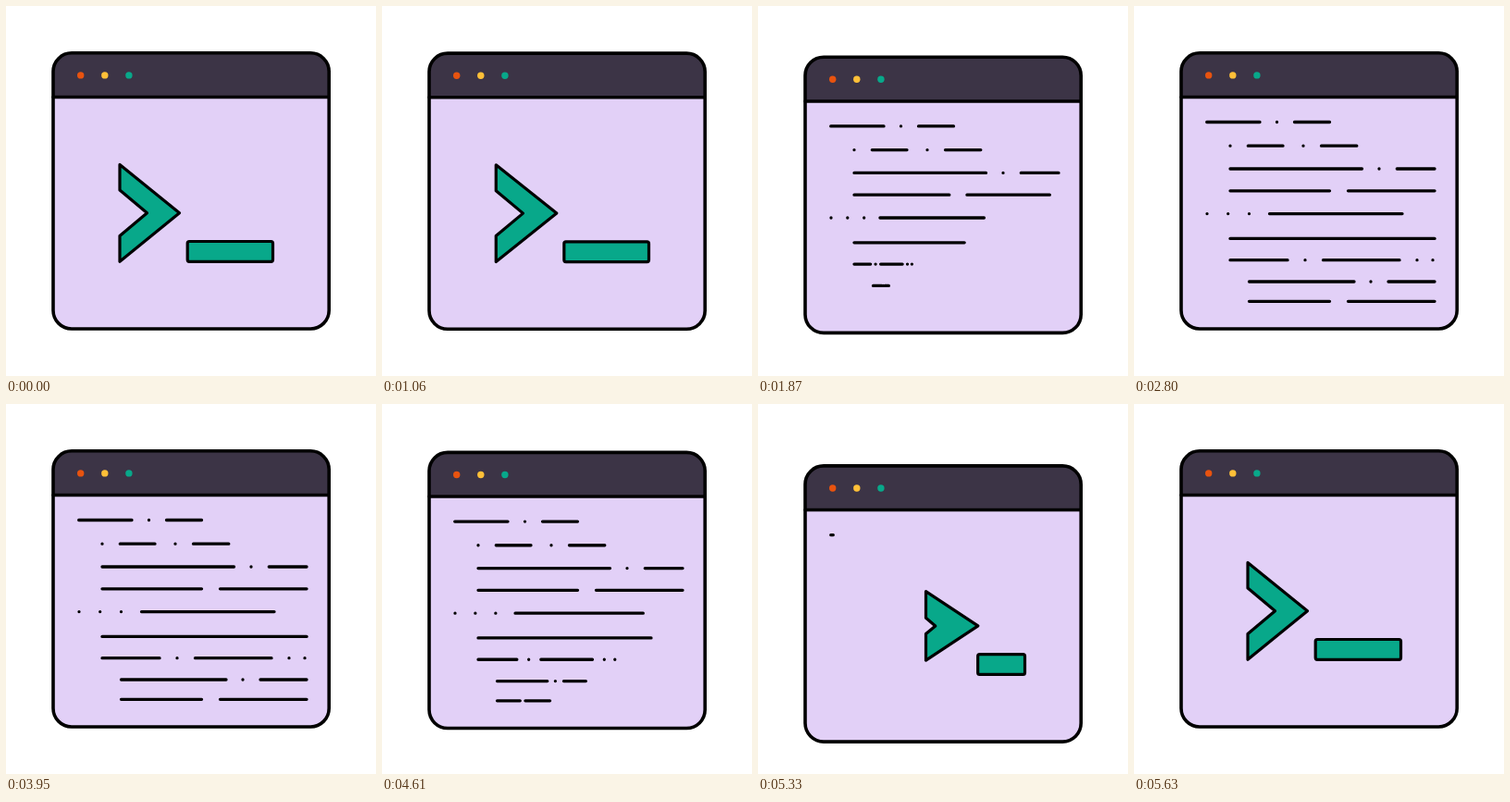
Recreate the animation shown at these times as an HTML page with a canvas. Size 400 px wide and 400 px high, loop 5.66 s.

```html
<!DOCTYPE html>
<html lang="en">
<head>
<meta charset="utf-8">
<title>Terminal</title>
<style>
  html, body { margin: 0; width: 100%; height: 100%; overflow: hidden; background: #fff; }
  canvas { display: block; width: 400px; height: 400px; }
</style>
</head>
<body>
<canvas id="stage"></canvas>
<script>
const LOOP = 5660;
const GREEN = '#08a88a';

// Code rows: baseline, time the row starts to retract, then segments [from, to]; a single number is a dot.
const rows = [
  { y: 125.5, leave: 4891, parts: [[78.7, 136], 154.5, [173.5, 211.5]] },
  { y: 151.2, leave: 4843, parts: [104, [123.3, 161], 183, [202.5, 240.8]] },
  { y: 176, leave: 4780, parts: [[104, 246.5], 265, [284.3, 325]] },
  { y: 199.8, leave: 4696, parts: [[104, 211.5], [231.5, 325]] },
  { y: 224.6, leave: 4556, parts: [79, 101.7, 124.5, [146.5, 290]] },
  { y: 251.4, leave: 4492, parts: [[104, 325]] },
  { y: 274.7, leave: 4428, parts: [[104, 166], 185, [204.5, 287], 306, 323] },
  { y: 298, leave: 4364, parts: [[124.5, 238], 256, [275, 325]] },
  { y: 319.3, leave: 4300, parts: [[124.5, 211.5], [231.5, 325]] }
];

const canvas = document.getElementById('stage');
const ctx = canvas.getContext('2d');
const density = window.devicePixelRatio || 1;
canvas.width = canvas.height = 400 * density;
ctx.lineCap = ctx.lineJoin = 'round';

const mix = (a, b, k) => a + (b - a) * k;

function ease(t, start, duration) {
  const x = Math.min(1, Math.max(0, (t - start) / duration));
  return x * x * (3 - 2 * x);
}

function paint(path, fill, width) {
  if (fill) {
    ctx.fillStyle = fill;
    ctx.fill(path);
  }
  ctx.lineWidth = width;
  ctx.stroke(path);
}

function roundRect(x, y, w, h, r) {
  const path = new Path2D();
  path.roundRect(x, y, w, h, r);
  return path;
}

function drawWindow() {
  const frame = roundRect(51, 50.8, 298.2, 298.2, 20);
  ctx.fillStyle = '#e2d0f7';
  ctx.fill(frame);
  ctx.fillStyle = '#3c3446';
  ctx.fill(roundRect(51, 50.8, 298.2, 47.7, [20, 20, 0, 0]));
  paint(new Path2D('M51 98.5H349'), null, 3.5);
  paint(frame, null, 3.6);
  ['#e8530f', '#ffc038', GREEN].forEach((color, i) => {
    ctx.fillStyle = color;
    ctx.beginPath();
    ctx.arc(80.7 + 26.1 * i, 74.9, 3.7, 0, 7);
    ctx.fill();
  });
}

// The prompt collapses towards its right end as k goes from 0 to 1.
function drawPrompt(k) {
  if (k >= 0.995) return;
  const right = 288.5, middle = 223.8;
  const left = mix(123, right, k ** 1.3);
  const tip = mix(187.5, right, k ** 0.87);
  const half = 52.4 * (1 - k ** 1.55);
  const open = Math.max(0, 1 - 1.45 * k);
  const gap = Math.min(half, 24.7 * open);
  const chevron = new Path2D(
    `M${left} ${middle - half}L${tip} ${middle}L${left} ${middle + half}` +
    `V${middle + gap}L${left + 29.5 * open} ${middle}L${left} ${middle - gap}Z`);
  paint(chevron, GREEN, 3.2);
  const start = mix(196.2, right, k);
  paint(roundRect(start, 254.5, right - start, 21.8, 2), GREEN, 3.2);
}

function drawRow({ y, leave, parts }, index, t) {
  const scale = ease(t, 1363 + 63.3 * index, 364) - ease(t, leave, 480);
  if (scale <= 0.004) return;
  const origin = [parts[0]].flat()[0];
  const path = new Path2D();
  for (const part of parts) {
    const [from, to = from + 0.01] = [part].flat().map(x => mix(origin, x, scale));
    path.moveTo(from, y);
    path.lineTo(to, y);
  }
  paint(path, null, 3.3);
}

function draw(t) {
  const drop = 18.7 * (ease(t, 1030, 408) - ease(t, 1438, 632)
                     + ease(t, 4476, 766) - ease(t, 5242, 380));
  ctx.setTransform(density, 0, 0, density, 0, 0);
  ctx.fillStyle = '#fff';
  ctx.fillRect(0, 0, 400, 400);
  ctx.strokeStyle = '#000';
  ctx.translate(0, drop);
  drawWindow();
  drawPrompt(ease(t, 1030, 636) - ease(t, 5000, 620));
  rows.forEach((row, i) => drawRow(row, i, t));
}

const begin = performance.now();
function tick() {
  draw((performance.now() - begin) % LOOP);
  requestAnimationFrame(tick);
}
tick();
</script>
</body>
</html>
```
